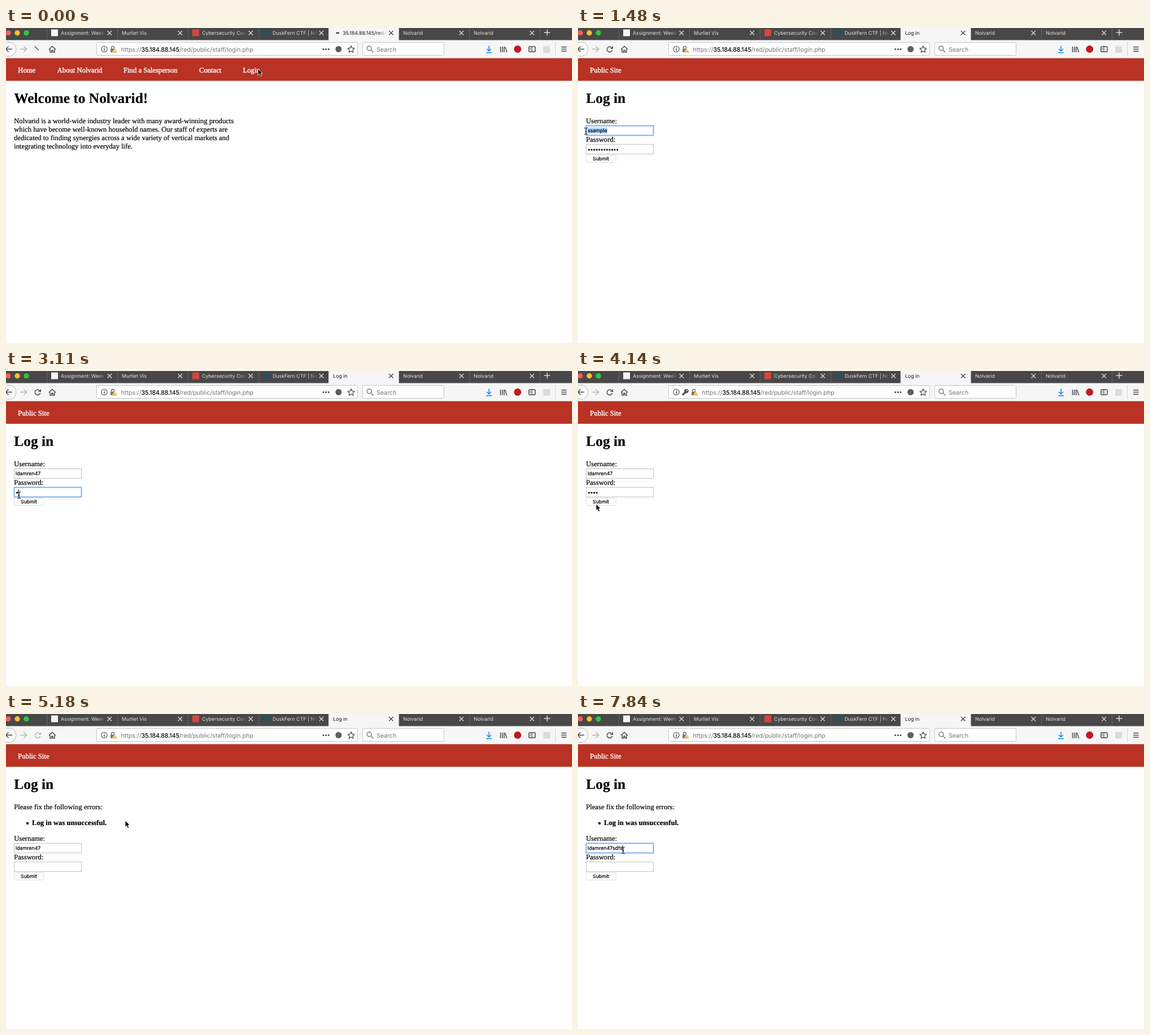
An HTML page for the animation above (7990 ms loop, 1002 px wide and 559 px high).

```html
<!DOCTYPE html>
<html lang="en">
<head>
<meta charset="utf-8">
<title>Login demo</title>
<style>
html, body { margin: 0; width: 100%; height: 100%; overflow: hidden; background: #fefefe; }
svg { display: block; width: 1002px; height: 559px; font: 8.8px Inter, sans-serif; text-rendering: geometricPrecision; }
.url { font-size: 10.6px; fill: #737373; }
.url tspan { fill: #0c0c0d; stroke: #0c0c0d; stroke-width: .2; }
.page { font: 12.67px "Liberation Serif", "Times New Roman", serif; }
.page text { stroke: #000; stroke-width: .2; }
.page .nav, .page .nav text { fill: #fff; stroke: #fff; stroke-width: .4; }
.head { font-size: 25.4px; font-weight: bold; }
.ui { font: 8.8px Inter, sans-serif; }
.line { fill: none; stroke: #4a4a4c; stroke-width: 1.5; }
.field { fill: #fff; stroke: #c2c2c2; }
.field.focus { stroke: #7fb2ee; stroke-width: 2; }
.dots { stroke: #000; stroke-width: 3.2; stroke-linecap: round; stroke-dasharray: 0 4.55; }
</style>
</head>
<body>
<svg viewBox="0 0 1002 559">
  <defs>
    <linearGradient id="fadeDark"><stop stop-color="#484848" stop-opacity="0"/><stop offset="1" stop-color="#484848"/></linearGradient>
    <linearGradient id="fadeLight"><stop stop-color="#f6f6f7" stop-opacity="0"/><stop offset="1" stop-color="#f6f6f7"/></linearGradient>
    <clipPath id="activeTab"><rect x="572" width="123" height="21.5"/></clipPath>
    <filter id="shadow" x="-10%" y="-10%" width="120%" height="125%"><feDropShadow dx="0" dy="2" stdDeviation="2.5" flood-opacity=".65"/></filter>
    <path id="key" d="M4-12a8 8 0 1 1-1.500 15.800L.5 6H-2.500V9H-5.500V12H-12V7.500L-3.500-1A8 8 0 0 1 4-12ZM6.500-8.500a2.300 2.300 0 1 0 .1 0Z" fill-rule="evenodd"/>
  </defs>
  <rect width="1002" height="559" fill="#fefefe"/>

  <!-- tab strip -->
  <rect width="1002" height="22" fill="#484848"/>
  <circle cx="4" cy="8.700" r="4.700" fill="#fc5b57"/>
  <circle cx="20" cy="8.700" r="4.700" fill="#fdbe2f"/>
  <circle cx="36" cy="8.700" r="4.700" fill="#2ac940"/>
  <g id="tabs"></g>
  <circle id="burst" cy="10" fill="#a6d0f8" clip-path="url(#activeTab)"/>
  <rect id="loader" y="7.500" width="6" height="2.500" rx="1" fill="#444"/>
  <text id="title" y="12" fill="#111"></text>
  <rect x="657" width="17" height="21" fill="url(#fadeLight)"/>
  <rect x="674" width="20" height="21" fill="#f6f6f7"/>
  <path d="M678 5l7.500 7.500m0-7.500l-7.500 7.500" class="line"/>
  <path d="M952.500 8h11M958 2.500v11" class="line" style="stroke:#ddd"/>

  <!-- toolbar -->
  <rect y="21.500" width="1002" height="32.500" fill="#f6f6f7"/>
  <rect y="53" width="1002" height="1" fill="#dcd5d5"/>
  <circle cx="5" cy="37.500" r="12.800" fill="#fbfbfb" stroke="#b5b5b5"/>
  <path d="M11 37.500H0M4.500 32.500l-5 5 5 5" class="line"/>
  <path d="M25 37.500h11M31.500 32.500l5 5-5 5" class="line" style="stroke:#b4b4b5"/>
  <g id="reload">
    <path d="M60.600 38.800A4.700 4.700 0 1 1 59 34.300" class="line"/>
    <path d="M62 32v5h-5z" fill="#4a4a4c"/>
  </g>
  <path id="stop" class="line"/>
  <path d="M76 38l6-5.500 6 5.500M78 37.500v5.500h2.800v-3.500h2.400v3.500h2.800v-5.500" class="line"/>
  <rect x="160.500" y="25.500" width="462" height="23" rx="2" fill="#fff" stroke="#c5c5c6"/>
  <rect x="631.500" y="25.500" width="144" height="23" rx="2" fill="#fff" stroke="#c5c5c6"/>
  <circle cx="174" cy="37.500" r="5.200" class="line" style="stroke-width:1.100"/>
  <path d="M174 36.500v4M174 34.200v1.200" class="line"/>
  <use id="urlKey" href="#key" transform="translate(190 37.500) scale(.48)" fill="#555"/>
  <g id="address">
    <path d="M186.500 37v-2a2.500 2.500 0 0 1 5 0v2" class="line" style="stroke:#777"/>
    <rect x="185" y="36.500" width="8" height="6.500" rx="1" fill="#777"/>
    <path d="M192.500 35.500l4.800 8.500h-9.600z" fill="#f5b32e" stroke="#fff" stroke-width=".6"/>
    <path d="M192.500 38.500v2.500m0 .9v1" stroke="#fff"/>
    <text class="url" x="203.500" y="41.700">https://<tspan>35.184.88.145</tspan>/red/public/staff/login.php</text>
  </g>
  <g fill="#555"><circle cx="561.800" cy="37.700" r="1.600"/><circle cx="566.500" cy="37.700" r="1.600"/><circle cx="571.200" cy="37.700" r="1.600"/></g>
  <circle cx="588.700" cy="37.500" r="5.500" fill="#5d5d5f"/>
  <path d="M611 31.800l1.800 3.800 4.200.500-3.100 2.900.8 4.200-3.700-2.100-3.700 2.100.8-4.200-3.100-2.900 4.200-.5z" class="line" stroke-linejoin="round" style="stroke-width:1.300"/>
  <circle cx="643" cy="36" r="4" class="line" style="stroke:#777"/>
  <path d="M646 39l4.500 4.500" class="line" style="stroke:#777"/>
  <text class="url" x="656" y="41.700">Search</text>
  <path d="M855 31.500v9M851 37l4 4 4-4M850 43.700h10" class="line" style="stroke:#0a84ff"/>
  <path d="M875.500 33v10M878.700 33v10M881.800 33v10M883.500 33.500l3.200 9.500" class="line"/>
  <circle cx="905.700" cy="37.500" r="6.500" fill="#c31820"/>
  <rect x="925.700" y="33" width="11.300" height="9.300" rx="1.500" class="line"/>
  <path d="M931 33v9M927.500 36h2M927.500 38h2" class="line" style="stroke-width:1.100"/>
  <rect x="951" y="32" width="12" height="12" rx="1" fill="#dcdcdc"/>
  <path d="M972.500 25v25" stroke="#d4d4d5"/>
  <path d="M983 33.700h9.500M983 37.500h9.500M983 41.300h9.500" class="line"/>

  <!-- web page -->
  <rect y="53.700" width="1002" height="40" fill="#b93223"/>
  <g class="page">
    <g id="home">
      <g class="nav">
        <text x="21.300" y="78.800">Home</text>
        <text x="90.700" y="78.800">About Nolvarid</text>
        <text x="208" y="78.800">Find a Salesperson</text>
        <text x="342" y="78.800">Contact</text>
        <text x="419.500" y="78.800">Login</text>
      </g>
      <text class="head" x="14.300" y="132.700">Welcome to Nolvarid!</text>
      <text y="169">
        <tspan x="14.200">Nolvarid is a world-wide industry leader with many award-winning products</tspan>
        <tspan x="14.200" dy="15.100">which have become well-known household names. Our staff of experts are</tspan>
        <tspan x="14.200" dy="15.100">dedicated to finding synergies across a wide variety of vertical markets and</tspan>
        <tspan x="14.200" dy="15.100">integrating technology into everyday life.</tspan>
      </text>
    </g>
    <g id="login">
      <text class="nav" x="21.300" y="78.800">Public Site</text>
      <text class="head" x="14.300" y="132.700">Log in</text>
      <g id="errors">
        <text x="14.200" y="169">Please fix the following errors:</text>
        <circle cx="38" cy="194" r="2.200"/>
        <text x="46" y="197" font-weight="bold">Log in was unsuccessful.</text>
      </g>
      <g id="form">
        <text x="14.200" y="169">Username:</text>
        <rect id="userField" class="field" x="14.500" y="173.500" width="119" height="17"/>
        <rect id="userPick" x="17" y="176.500" width="35" height="11" fill="#b3d7ff"/>
        <text id="user" class="ui" x="17" y="185.200"></text>
        <text x="14.200" y="202">Password:</text>
        <rect id="passField" class="field" x="14.500" y="206.500" width="119" height="17"/>
        <rect id="passPick" x="17" y="209.500" width="55" height="11" fill="#b3d7ff"/>
        <path id="pass" class="dots"/>
        <path id="caret" stroke="#000"/>
        <rect x="15" y="225.500" width="52" height="13" rx="2" fill="#fff" stroke="#dedede"/>
        <text class="ui" x="26" y="234.700">Submit</text>
      </g>
    </g>
  </g>

  <!-- password prompt -->
  <g id="prompt">
    <path d="M171 52h12l7-7 7 7h256v148.500a4 4 0 0 1-4 4H175a4 4 0 0 1-4-4z" fill="#fff" filter="url(#shadow)"/>
    <path d="M171 171.500h141v33H175a4 4 0 0 1-4-4z" fill="#e3e3e3"/>
    <path d="M312 171.500h141v29a4 4 0 0 1-4 4H312z" fill="#0996f8"/>
    <path d="M275.500 171.500v33" stroke="#cfcfcf"/>
    <use href="#key" transform="translate(196 77.500)" fill="#757575"/>
    <text x="226" y="74">Would you like Tilvera to save this login for</text>
    <text x="226" y="85">https://35.184.88.145?</text>
    <rect class="field" x="225.500" y="98.500" width="211" height="16"/>
    <text x="228" y="109.700">ldamren47</text>
    <rect class="field" x="225.500" y="121" width="211" height="15.500"/>
    <path class="dots" d="M230 129h14"/>
    <rect class="field" x="226" y="145.500" width="8.500" height="8.500" rx="2" style="stroke:#999"/>
    <text x="238" y="152.800">Show password</text>
    <text x="201" y="191.700">Don’t Save</text>
    <path d="M289.500 186.500l4.300 4.300 4.300-4.300" class="line" style="stroke:#222"/>
    <text x="373" y="191.700" fill="#fff" font-weight="500">Save</text>
  </g>

  <g id="pointer">
    <path id="arrow" d="M0 0V11.500L2.600 9.200L4.500 13.600L6.700 12.600L4.800 8.300H8.300Z" stroke="#fff" stroke-width=".9"/>
    <path id="beam" d="M-3-6q3 0 3 2q0-2 3-2M0-4v8M-3 6q3 0 3-2q0 2 3 2M-1.500 1h3" fill="none" stroke="#111"/>
  </g>
</svg>
<script>
const $ = id => document.getElementById(id);
const show = (id, on) => $(id).style.display = on ? "" : "none";
const put = (id, attrs) => { for (const a in attrs) $(id).setAttribute(a, attrs[a]); };

// left edge, title, icon shape, icon colour
const square = (x, fill) => `<rect x="${x + 8}" y="2.500" width="12" height="12" fill="${fill}"/>`;
const disc = (x, fill) => `<circle cx="${x + 14}" cy="8.500" r="6" fill="${fill}"/>`;
const tabs = [
  [72, "Assignment: Week 10", square, "#f4f4f4"],
  [197, "Murliet Vis"],
  [322, "Cybersecurity Course", square, "#d8463a"],
  [447, "DuskFern CTF | Nol", disc, "#28505e"],
  [695, "Nolvarid"],
  [820, "Nolvarid"]
];
$("tabs").innerHTML = tabs.map(([x, name, mark, fill]) => `
  <path d="M${x + .5} 0v22" stroke="#636363"/>${mark ? mark(x, fill) : ""}
  <text x="${x + (mark ? 25 : 8)}" y="12" fill="#e4e4e4">${name}</text>
  <rect x="${x + 89}" width="15" height="21" fill="url(#fadeDark)"/>
  <rect x="${x + 104}" width="20" height="21" fill="#484848"/>
  <path d="M${x + 107.5} 5l7.500 7.500m0-7.500l-7.500 7.500" class="line" style="stroke:#ddd;stroke-width:1.300"/>`).join("") +
  `<path d="M945.500 0v22" stroke="#636363"/><rect x="571" width="124.500" height="22" fill="#f6f6f7"/>`;

const LOOP = 7990, TICK = 148;
const NAME = "ldamren47", EXTRA = "sdfs";

// tick, x, y
const path = [
  [0, 446, 72], [1, 352, 104], [3, 110, 196], [4, 65, 213], [7, 62, 183], [9, 58, 183],
  [10, 14, 183], [15, 87, 213], [19, 82, 214], [20, 16, 215], [22, 30, 226], [24, 38, 237],
  [26, 36, 237], [28, 32, 236], [29, 40, 232], [32, 178.5, 188], [33, 214, 189], [35, 211, 189],
  [38, 150, 198], [41, 72, 192], [42, 60, 190], [45, 58, 226], [47, 80, 240], [49, 80, 242], [54, 80, 242]
];

function pointerAt(k) {
  const i = path.findIndex(p => p[0] > k);
  const [a, x, y] = path[i - 1], [b, u, v] = path[i];
  const f = (k - a) / (b - a);
  return [x + (u - x) * f, y + (v - y) * f];
}

const within = (k, a, b) => k >= a && k <= b;

function drawBrowser(k) {
  const loading = k === 0 || within(k, 29, 31);
  const pop = k === 1 || k === 32, fading = k === 2 || k === 33;
  show("loader", loading);
  put("loader", { x: k === 0 ? 584 : 578 + (k - 28) * 3 });
  $("title").textContent = k === 0 ? "35.184.88.145/red/pu" : "Log in";
  put("title", { x: loading ? 596 : 579 });
  show("burst", pop || fading);
  put("burst", { cx: 585.5, r: pop ? 17 : 60, opacity: pop ? 1 : .25 });

  const stopping = k < 2 || within(k, 29, 33);
  const idle = within(k, 2, 6) || within(k, 34, 38);
  show("stop", stopping);
  put("stop", { d: k === 0 ? "M51 32.500l6.500 6.500" : "M51.500 33l9 9m0-9l-9 9", opacity: k === 0 ? 1 : .4 });
  show("reload", !stopping);
  put("reload", { opacity: idle ? .35 : 1 });

  const key = within(k, 27, 33);
  show("urlKey", key);
  put("address", { transform: `translate(${key ? 16 : 0})` });
  show("prompt", within(k, 32, 33));
}

function drawPage(k) {
  const failed = k >= 31;
  show("home", k === 0);
  show("login", k > 0);
  show("errors", failed);
  put("form", { transform: `translate(0 ${failed ? 56 : 0})` });

  const typed = NAME.slice(0, 2 * (k - 10) - 1);
  const extra = k > 50 ? EXTRA.slice(0, Math.round((k - 50) * 4 / 3)) : "";
  $("user").textContent = k < 11 ? "ssample" : typed + extra;
  const count = failed ? 0 : k < 21 ? 12 : Math.min(4, k - 20);
  put("pass", { d: count ? `M19.500 216h${(count - 1) * 4.55 + .1}` : "" });

  const inUser = within(k, 9, 18) || k >= 49, inPass = within(k, 19, 25);
  $("userField").classList.toggle("focus", inUser);
  $("passField").classList.toggle("focus", inPass);
  show("userPick", k === 10);
  show("passPick", k === 20);

  show("caret", within(k, 11, 14) || k === 16 || within(k, 21, 24) || k >= 49);
  const x = inPass ? 18 + count * 4.55 : 17.5 + $("user").getComputedTextLength();
  put("caret", { d: `M${x} ${inPass ? 210 : 177}v11` });
}

function drawPointer(k) {
  const [x, y] = pointerAt(k);
  const top = k >= 31 ? 229 : 173;
  const overText = k > 0 && within(x, 13, 134) && (within(y, top, top + 18) || within(y, top + 33, top + 51));
  put("pointer", { transform: `translate(${x} ${y})` });
  show("arrow", !overText);
  show("beam", overText);
}

function draw() {
  const k = Math.min(53, Math.floor((performance.now() % LOOP + 12) / TICK));
  drawBrowser(k);
  drawPage(k);
  drawPointer(k);
  requestAnimationFrame(draw);
}
draw();
</script>
</body>
</html>
```
